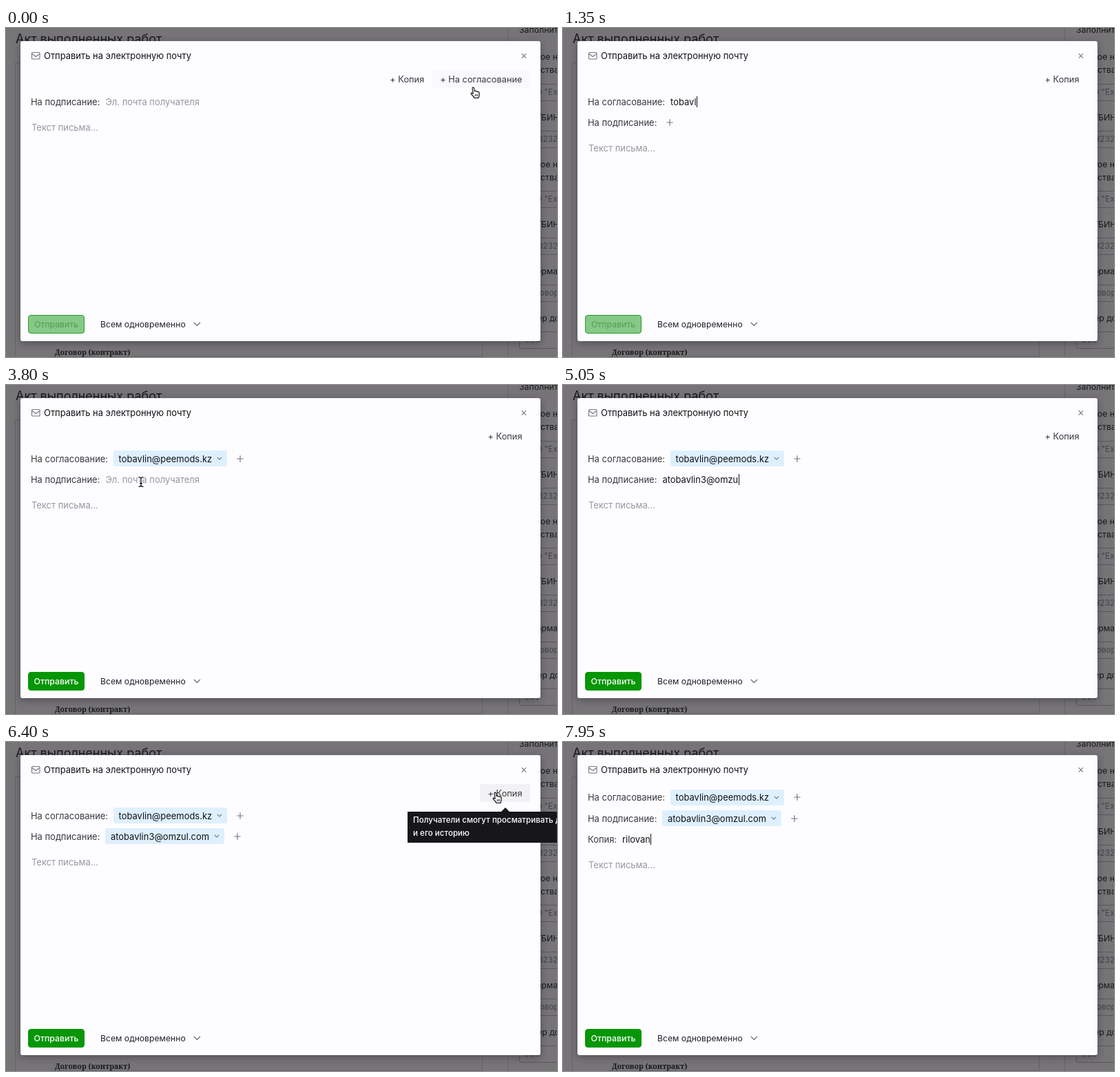
An HTML page for the animation above (8 s loop, 800 by 477 pixels).

```html
<!DOCTYPE html>
<html lang="ru">
<head>
<meta charset="utf-8">
<title>Отправка документа</title>
<style>
html, body { margin: 0; width: 100%; height: 100%; overflow: hidden; background: #767477; }
#stage { position: relative; width: 800px; height: 477px; overflow: hidden; font: 12.95px/24px Inter, sans-serif; color: #39383c; white-space: pre; }
#stage * { box-sizing: border-box; }
.at { position: absolute; }
svg { display: block; fill: none; overflow: visible; }
#page { inset: 0; color: #19181b; font-size: 12.3px; }
.rule { position: absolute; background: #656367; }
.input { position: absolute; left: 745px; width: 120px; height: 25px; padding-left: 7px; border: 1px solid #59575b; border-radius: 3px; font-size: 11.8px; line-height: 22px; color: #444246; }
#modal { left: 21px; top: 19px; width: 755px; height: 435px; border-radius: 3px; background: #fdfcfe; box-shadow: 0 3px 12px rgba(0,0,0,.32); }
#icons { left: 0; top: 0; }
.row { position: absolute; left: 36px; height: 24px; display: flex; align-items: center; gap: 8px; }
.hint { color: #98969b; }
.typed { color: #121114; }
.caret { display: inline-block; height: 16px; margin: 0 -1.3px 0 .5px; border-left: 1.3px solid #111; vertical-align: -3px; }
.chip { display: flex; align-items: center; gap: 7px; height: 23px; padding: 0 7px 0 7.5px; border-radius: 3px; background: #def0fe; color: #121114; }
.plus { margin-left: 5.5px; }
#links { right: 39px; top: 61px; display: flex; font-size: 12.8px; }
#links span { height: 26px; line-height: 27px; padding: 0 11.5px; border-radius: 3px; }
#send { left: 32px; top: 416px; width: 82px; height: 27px; border: 1px solid; border-radius: 4px; text-align: center; font-size: 12.3px; font-weight: 500; line-height: 26px; }
#tip { top: 100.5px; width: 284px; height: 45px; padding: 3.5px 8px; background: #17161a; color: #fff; font-size: 11.6px; font-weight: 500; line-height: 18.7px; }
#tip::before { content: ""; position: absolute; left: 136px; top: -6px; border: 6px solid transparent; border-top: 0; border-bottom-color: #17161a; }
</style>
</head>
<body>
<div id="stage">
  <div id="page" class="at">
    <span class="at" style="left:14px;top:4px;font-size:18px">Акт выполненных работ</span>
    <i class="rule" style="left:13px;top:50px;width:1px;height:427px"></i>
    <i class="rule" style="left:13px;top:50px;width:678px;height:1px"></i>
    <i class="rule" style="left:691px;top:50px;width:1px;height:427px"></i>
    <i class="rule" style="left:728px;top:0;width:1px;height:477px"></i>
    <i class="rule" style="left:66px;top:476px;width:625px;height:1px"></i>
    <b class="at" style="left:71px;top:458px;font:bold 10.6px/24px 'Noto Serif',serif">Договор (контракт)</b>
  </div>
  <div id="modal" class="at"></div>
  <svg id="icons" class="at" width="800" height="477" stroke="#77757a" stroke-width="1.1">
    <rect x="37.5" y="35.5" width="11.5" height="9.5" rx="1"/>
    <path d="M38 37.5l5.3 4 5.3-4M748.7 37.2l6.4 6.4m0-6.4l-6.4 6.4"/>
    <path d="M272.8 427l4.6 4.6 4.6-4.6" stroke-width="1.4"/>
  </svg>
  <span class="at typed" style="left:55px;top:28px">Отправить на электронную почту</span>
  <div id="links" class="at"></div>
  <div id="rows"></div>
  <span id="message" class="at hint" style="left:37px">Текст письма...</span>
  <div id="send" class="at">Отправить</div>
  <span class="at" style="left:137px;top:418px;font-size:12.2px;color:#222125">Всем одновременно</span>
  <div id="tip" class="at"></div>
  <svg id="hand" class="at" width="15" height="18" fill="#fff" stroke="#19181b" stroke-width="1.2" stroke-linejoin="round">
    <path fill="#fff" d="M3 2Q4.3.3 5.5 2L6.2 6.5Q7.6 5.6 8.4 7Q10 6.2 10.8 7.6Q12.9 7.2 13.2 9.2V12Q13 14.2 12 16.4H6Q5 14 2 11.5Q.4 9.5 2 9.1L4.2 10.2Z"/>
    <path d="M7.2 11v3M9 11v3M10.8 11v3" stroke-width=".8"/>
  </svg>
  <svg id="beam" class="at" width="8" height="15">
    <defs><path id="beamShape" d="M.5.6Q3.6.6 4 2.2Q4.4.6 7.5.6M4 2.2V12.8M.5 14.4Q3.6 14.4 4 12.8Q4.4 14.4 7.5 14.4M2 9.6H6"/></defs>
    <use href="#beamShape" stroke="#fff" stroke-width="2.8"/>
    <use href="#beamShape" stroke="#111" stroke-width="1.3"/>
  </svg>
</div>
<script>
const LOOP = 8000;
const $ = id => document.getElementById(id);

// Form behind the dialog: labels and inputs by vertical centre
const labels = [['Заполните', 3], ['Полное н', 42], ['ИИН/БИН', 130], ['Полное н', 198], ['ИИН/БИН', 285], ['Информация', 353], ['Номер до', 421]];
const inputs = [['ТОО "Exa', 93], ['1233232', 161], ['ТОО "Exa', 248], ['1233232', 316], ['Договор', 384], ['000', 452]];
$('page').innerHTML +=
  labels.map(([text, y]) => `<span class="at" style="left:745px;top:${y - 12}px">${text}</span>`).join('') +
  [61, 217].map(y => `<span class="at" style="left:776px;top:${y - 12}px">ства</span>`).join('') +
  inputs.map(([text, y]) => `<div class="input" style="top:${y - 12.5}px">${text}</div>`).join('');

// keys: [time, number of characters typed]
const approval = { label: 'На согласование:', text: 'tobavlin@peemods.kz', show: 550, focus: 550, done: 2900,
  keys: [[830, 1], [1330, 6], [1730, 10], [2540, 19]] };
const signing = { label: 'На подписание:', text: 'atobavlin3@omzul.com', show: 0, focus: 3900, done: 5600,
  keys: [[3950, 1], [5030, 15], [5400, 20]] };
const copy = { label: 'Копия:', text: 'rilovan', show: 6600, focus: 6600, done: Infinity,
  keys: [[7200, 1], [7920, 7]] };
const fields = [approval, signing, copy];

const caret = '<i class="caret"></i>';
const hint = '<span class="hint">Эл. почта получателя</span>';
const plus = '<svg class="plus" width="10" height="10" stroke="#77757a" stroke-width="1.2"><path d="M5 .3v9.4M.3 5h9.4"/></svg>';
const chevron = '<svg width="8" height="5" stroke="#6d7f8e" stroke-width="1.2"><path d="M.8.8L4 4 7.2.8"/></svg>';

const clamp = x => Math.max(0, Math.min(1, x));
const progress = (t, from, to) => clamp((t - from) / (to - from));
const mix = (a, b, k) => a + (b - a) * k;
const smooth = k => k * k * (3 - 2 * k);
const focused = (field, t) => t >= field.focus && t < field.done;

function typedText({ text, keys }, t) {
  let count = 0;
  keys.forEach(([time, n], i) => {
    if (t < time) return;
    const next = keys[i + 1] || [time + 1, n];
    count = Math.floor(mix(n, next[1], progress(t, time, next[0])));
  });
  return text.slice(0, count);
}

function fieldValue(field, t) {
  if (t >= field.done) return `<span class="chip">${field.text}${chevron}</span>${plus}`;
  if (focused(field, t)) {
    const text = typedText(field, t);
    return text ? `<span class="typed">${text}${caret}</span>` : `<span>${caret}${hint}</span>`;
  }
  return fields.some(other => focused(other, t)) ? plus : hint;
}

function setHtml(id, html) {
  const node = $(id);
  if (node.shown !== html) node.innerHTML = node.shown = html;
}

function place(id, visible, x = 0, y = 0) {
  const style = $(id).style;
  style.display = visible ? 'block' : 'none';
  style.left = x + 'px';
  style.top = y + 'px';
}

function drawRows(t) {
  const visible = fields.filter(field => t >= field.show);
  const first = t < copy.show ? 106.6 : 80.2;
  setHtml('rows', visible.map((field, i) =>
    `<div class="row" style="top:${first + 30.3 * i - 12}px"><span>${field.label}</span>${fieldValue(field, t)}</div>`).join(''));
  $('message').style.top = first + 30.3 * (visible.length - 1) + 25 + 'px';
}

function drawLinks(t) {
  const link = (text, hover) => `<span style="background:rgba(60,60,65,${(0.055 * hover).toFixed(3)})">${text}</span>`;
  setHtml('links', t >= copy.show ? '' :
    link('+ Копия', progress(t, 6200, 6300)) +
    (t < approval.show ? link('+ На согласование', mix(.35, 1, progress(t, 0, 150))) : ''));
}

function drawTip(t) {
  const early = t < 1000;
  const [open, close] = early ? [150, 550] : [6270, 6600];
  setHtml('tip', early ? 'Получатели смогут согласовать документ\nи его историю' : 'Получатели смогут просматривать документ\nи его историю');
  $('tip').style.left = (early ? 548 : 583) + 'px';
  $('tip').style.opacity = progress(t, open, open + 100) * (1 - progress(t, close, close + 100));
}

function drawSend(t) {
  const ready = t >= approval.done;
  Object.assign($('send').style, {
    background: ready ? '#069606' : '#86c986',
    borderColor: ready ? '#069606' : '#249a2c',
    color: ready ? '#fff' : '#579a59',
    fontWeight: ready ? 500 : 400
  });
}

function drawCursor(t) {
  const arrive = 1 - (1 - progress(t, 2950, 3650)) ** 2;
  const leave = smooth(progress(t, 5650, 6270));
  const x = t < 5000 ? mix(455, 196, arrive) : mix(196, 711, leave);
  const y = t < 5000 ? mix(205, 140, arrive) : mix(140, 80, leave);
  const onLink = t > 5000 && x > 689;
  const moving = (t >= 2950 && t < 3950) || (t >= 5650 && t < copy.show);
  place('beam', moving && !onLink, x - 4, y - 7.5);
  if (t < approval.show) place('hand', true, 674, 84.5);
  else place('hand', moving && onLink, x - 5, y - 8);
}

function frame() {
  const t = performance.now() % LOOP;
  [drawRows, drawLinks, drawTip, drawSend, drawCursor].forEach(draw => draw(t));
  requestAnimationFrame(frame);
}
frame();
</script>
</body>
</html>
```
